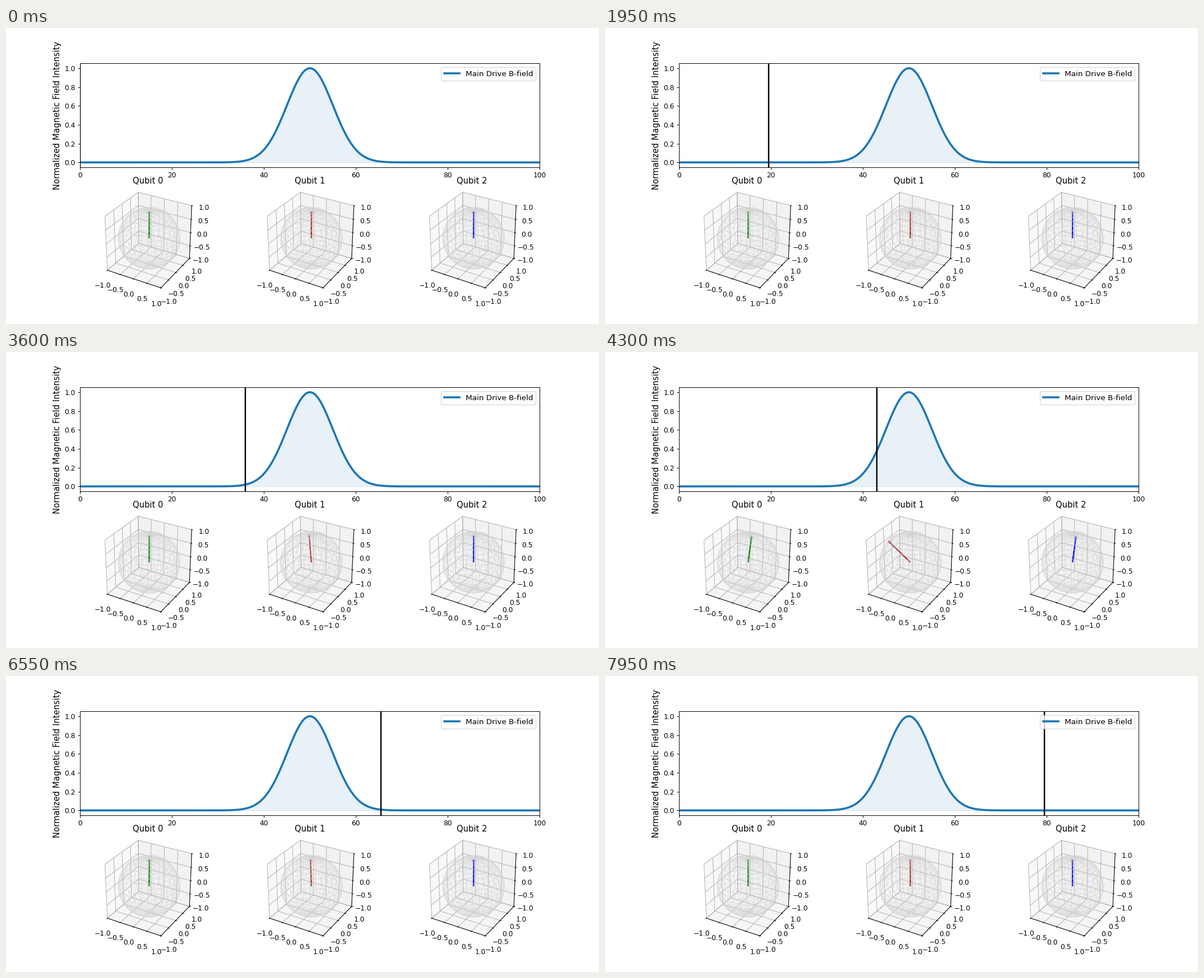
A matplotlib script for the animation above (8000 ms loop, 1058 by 529 pixels).

```python
import numpy as np
import matplotlib.pyplot as plt
from matplotlib.animation import FuncAnimation

FRAMES, INTERVAL = 160, 50
PULSE_MID, PULSE_WIDTH = 50, 5
QUBITS = [("green", 0.35), ("brown", -3.9), ("blue", 0.35)]  # colour, coupling
WOBBLE, WOBBLE_RATE = 0.004, np.radians(6.5)

plt.rcParams["font.family"] = "DejaVu Sans"
fig = plt.figure(figsize=(12, 6), dpi=1058 / 12)


def drive(t):
    return np.exp(-((t - PULSE_MID) ** 2) / (2 * PULSE_WIDTH ** 2))


def spin(t, coupling):
    """Unit vector following the effective field, with a faint precession."""
    tilt = np.arctan(coupling * drive(t))
    phase = WOBBLE_RATE * t
    v = np.array([np.sin(tilt) + WOBBLE * np.cos(phase),
                  WOBBLE * np.sin(phase),
                  np.cos(tilt)])
    return v / np.linalg.norm(v)


def make_field_plot():
    ax = fig.add_subplot(2, 1, 1)
    t = np.linspace(0, 100, 1000)
    ax.plot(t, drive(t), lw=3, color="C0", label="Main Drive B-field")
    ax.fill_between(t, drive(t), color="C0", alpha=0.1)
    ax.set_xlim(0, 100)
    ax.set_ylabel("Normalized Magnetic Field Intensity", fontsize=12)
    ax.legend(loc="upper right", fontsize=11)
    return ax.axvline(0, color="black", lw=2)


def make_sphere(index):
    ax = fig.add_subplot(2, 3, 4 + index, projection="3d")
    u, v = np.mgrid[0:2 * np.pi:30j, 0:np.pi:20j]
    ax.plot_wireframe(np.cos(u) * np.sin(v), np.sin(u) * np.sin(v), np.cos(v),
                      color="lightgray", alpha=0.3)
    ax.set(xlim=(-1, 1), ylim=(-1, 1), zlim=(-1, 1), title=f"Qubit {index}")
    ax.set_box_aspect((1, 1, 1))
    return ax


def freeze_box(ax):
    """Keep the projected panes, grid and ticks as plain artists, for speed."""
    axes3 = (ax.xaxis, ax.yaxis, ax.zaxis)
    parts = [a.pane for a in axes3] + [a.gridlines for a in axes3]
    for a in axes3:
        parts.append(a.line)
        for tick in a.get_major_ticks():
            parts += [tick.tick1line, tick.label1]
    for part in parts:
        part.set_zorder(-1)
        fig.add_artist(part)
    ax.patch.set_visible(False)
    ax.set_axis_off()


cursor = make_field_plot()
spheres = [make_sphere(i) for i in range(3)]
fig.draw_without_rendering()
for sphere in spheres:
    freeze_box(sphere)

arrows = []


def update(frame):
    t = frame * 100 / 200
    cursor.set_xdata([t, t])
    while arrows:
        arrows.pop().remove()
    for ax, (color, coupling) in zip(spheres, QUBITS):
        arrows.append(ax.quiver(0, 0, 0, *spin(t, coupling), color=color,
                                lw=2, arrow_length_ratio=0.1))
    return [cursor, *arrows]


anim = FuncAnimation(fig, update, frames=FRAMES, interval=INTERVAL,
                     repeat=True, repeat_delay=0, blit=False)
plt.show()
```
